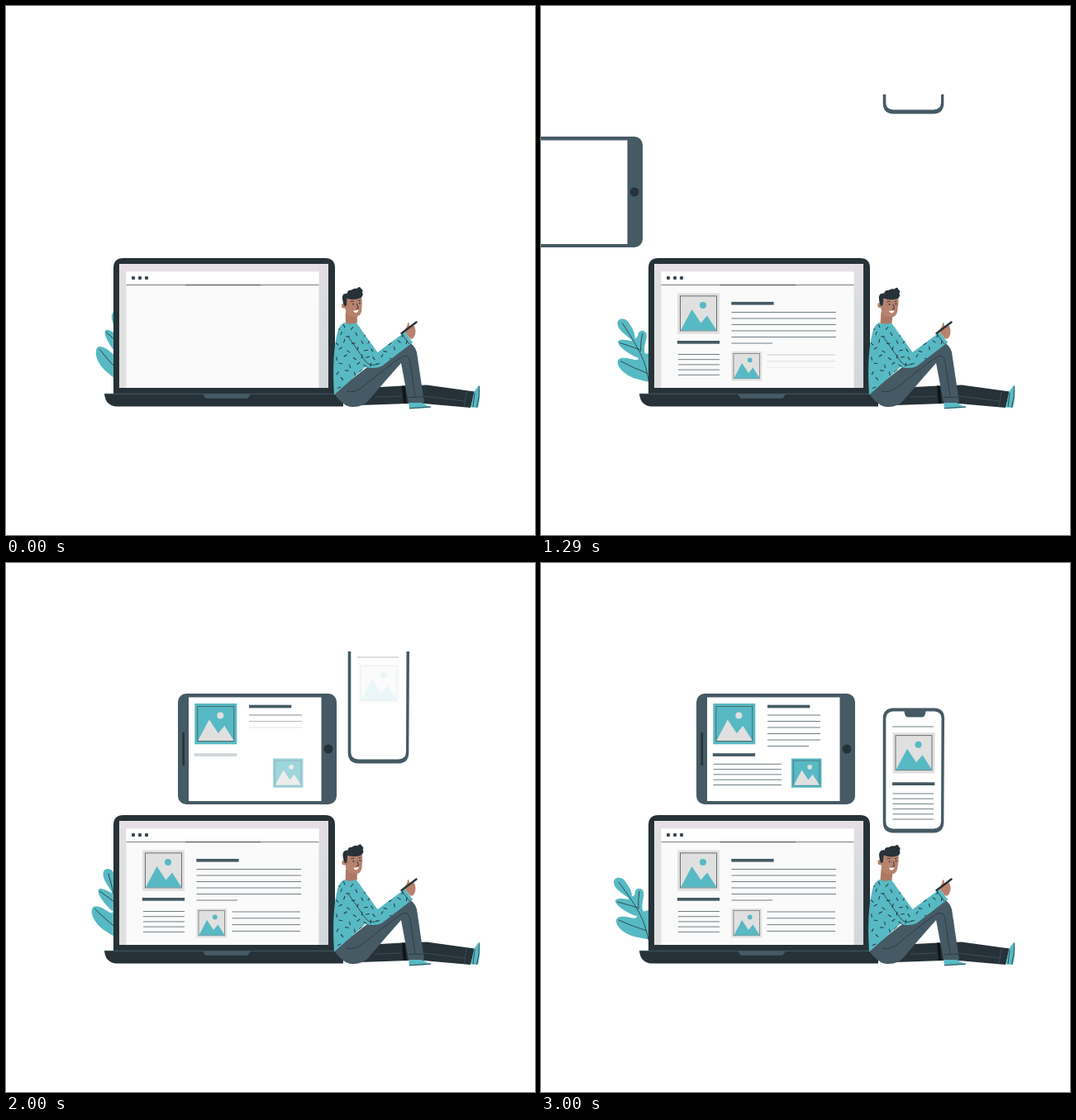
Animation, 640 px wide and 640 px high, one loop 3210 ms. Source, as an HTML page:

```html
<!DOCTYPE html>
<html lang="en">
<head>
<meta charset="utf-8">
<title>Devices</title>
<style>
html, body { margin: 0; width: 100%; height: 100%; overflow: hidden; background: #fff; }
svg { display: block; width: 100vw; height: 100vh; }
</style>
</head>
<body>
<svg id="stage" viewBox="0 0 640 640" fill="none">
  <defs>
    <clipPath id="phoneClip"><rect y="107" width="640" height="400"/></clipPath>
    <clipPath id="sweaterClip"><use href="#sweater"/></clipPath>
    <linearGradient id="side" x1="0" y1="312" x2="0" y2="462" gradientUnits="userSpaceOnUse">
      <stop stop-color="#e4dde4"/><stop offset=".35" stop-color="#d8dce0"/><stop offset="1" stop-color="#d3d8dc"/>
    </linearGradient>
  </defs>

  <g id="plant">
    <path fill="#57b9c3" d="M88 386C88 380 97 379 101 384C106 391 110 396 110 403C112 404 114 401 114 397C116 392 123 393 124 398C125 406 121 412 123 420C125 424 130 418 134 420L140 455C135 456 125 455 118 453C104 451 92 442 91 434C90 427 100 427 108 429C113 430 116 430 116 427C112 427 90 416 90 409C91 404 104 407 107 407C104 402 88 396 88 386Z"/>
    <path stroke="#263238" stroke-width=".8" d="M94 386C105 401 119 420 125 437Q129 449 132 464M92 410Q104 413 117 417M119 397Q117 408 118 419M94 432Q112 440 128 445"/>
  </g>

  <g id="tablet">
    <rect x="188" y="158" width="192" height="134" rx="10" fill="#455a64"/>
    <rect x="201" y="162.5" width="160.5" height="125.5" fill="#fff"/>
    <circle cx="370" cy="225" r="5.5" fill="#263238"/>
    <path stroke="#263238" stroke-width="2.5" d="M194.7 205V245"/>
  </g>

  <g clip-path="url(#phoneClip)"><g id="phone">
    <path fill="#455a64" d="M426 175.5H476Q488 176 488 188L487.3 314Q487 326 475 326.5H426Q414 326 413.7 314V188Q414 176 426 175.5Z"/>
    <path fill="#fff" d="M426 179.5H439.5Q440 186 444 186.500H461Q465 186 465.500 179.500H476Q484.500 180 484.500 188L484 313Q483.500 321 475 321.500H426Q417.500 321 417.300 313V188Q417.500 180 426 179.500Z"/>
  </g></g>

  <g id="laptop">
    <path fill="#263238" d="M130 470V317Q130 305 142 305H386Q398 305 398 317V470Z"/>
    <path fill="#e0e0e0" d="M137 312H390V462H137Z"/>
    <path fill="#e6dfe6" d="M137 312H390V321.500H137Z"/>
    <path fill="url(#side)" d="M378.500 312H390V462H378.500Z"/>
    <path fill="#fafafa" d="M145.500 321.500H378.500V462H145.500Z"/>
    <path fill="#fff" d="M145.500 321.500H378.500V337H145.500Z"/>
    <path stroke="#777f83" d="M145.500 337.500H378.500"/>
    <path stroke="#3c4448" d="M217 337.600H308"/>
    <g fill="#37474f"><circle cx="154" cy="329" r="2.200"/><circle cx="162" cy="329" r="2.200"/><circle cx="170" cy="329" r="2.200"/></g>
    <path fill="#263238" d="M119 469H408V484.500H133Q120 483 119 469Z"/>
    <path stroke="#455a64" d="M119 469.300H405"/>
    <path fill="#455a64" d="M238 469.500H296L292.500 474.800H241.500Z"/>
  </g>

  <g id="person">
    <path fill="#263238" d="M428 483L452 461L480 459.500L509 458.500L567 466.500L562 486L500 480.500Z"/>
    <path fill="#0d1418" d="M479 459.500H482.500L484.500 481H481Z"/>
    <path stroke="#455a64" stroke-width=".7" d="M446 473L478 472M505 472L555 478M557 466L554.500 484"/>
    <path fill="#57b9c3" d="M566 467L572.500 458Q574.500 473 571 486L562.500 485.500Z"/>
    <path stroke="#263238" stroke-width=".8" d="M572.800 460Q573 473 569.500 485.500M567 468L565 485"/>
    <path fill="#57b9c3" d="M487 480H503Q509 484 514.500 484.500L513 486L488 487.500Z"/>
    <path stroke="#37474f" stroke-width=".9" d="M488 486.700L514 485"/>
    <path fill="#455a64" d="M397 469C410 458 425 446 437 437Q465 419 482 408Q493 405 497 419L506 480H487L478 432Q460 452 439 477Q430 487 415 484.500Q406 482 397 469Z"/>
    <path stroke="#263238" stroke-width=".7" d="M412 466Q422 469 434 459Q468 431 480 424Q487 421 489 431L495 473M487 473.500L505 473"/>

    <g id="head">
      <path fill="#ad7966" d="M410 370L424 372L423 384Q415 387 409 384Z"/>
      <path fill="#b7826e" d="M409 353L431 350Q431.500 361 429.500 370Q428 377.500 419 376.500Q410 375 410 366Z"/>
      <circle cx="409" cy="362" r="3.200" fill="#b7826e"/>
      <path fill="#263238" d="M409.500 363Q405.500 352 409 348.500Q412 347 414 347.500Q414 343.500 419 344Q422 341.500 426 342.500Q430 339 431 343Q434 345 432 347.500Q434 351 430 354Q422 357 413 353.500L412 362Z"/>
      <path stroke="#263238" stroke-width=".9" d="M417 358Q419 356.800 421 357.700M426.500 357.500L429 357M424.500 361L426 366.500L423.500 367"/>
      <circle cx="420" cy="361" r=".9" fill="#263238"/><circle cx="428" cy="360.500" r=".9" fill="#263238"/>
      <path fill="#fff" d="M419.500 368.500Q423 369.500 426 368Q425 372 422 371.500Q420 371 419.500 368.500Z"/>
    </g>

    <path id="sweater" fill="#57b9c3" d="M409 383Q416 386 424 383.500L449.500 419L482.500 394.500L492 407L455 435.500Q446 440 435 436.500Q418 452 397 470.500Q394 422 401 395Q403 386 409 383Z"/>
    <g id="ticks" clip-path="url(#sweaterClip)" stroke="#263238" stroke-width="1"/>
    <path stroke="#263238" stroke-width=".8" d="M414 400L435 430Q441 437 449 433M479 397L488 409"/>
    <path fill="#b7826e" d="M483 395Q482 391 485 388L486 383.500Q488 382 488 387L494 387Q497 394 494 400Q492 404 488.500 402Z"/>
    <path stroke="#263238" stroke-width="2.400" stroke-linecap="round" d="M478.500 396L496.500 382.500"/>
  </g>
</svg>
<script>
const NS = 'http://www.w3.org/2000/svg';
const TEAL = '#57b9c3', SLATE = '#455a64', GREY = '#e0e0e0';
const FPS = 14, LAST = 42, LOOP = 3210;
const $ = id => document.getElementById(id);
const fades = [];

function add(parent, tag, attrs) {
  const el = document.createElementNS(NS, tag);
  for (const k in attrs) el.setAttribute(k, attrs[k]);
  return parent.appendChild(el);
}

function fadeIn(el, start, length = 4) {
  fades.push({ el, start, length });
}

function picture(parent, x, y, scale, back, front, start, length) {
  const g = add(parent, 'g', { transform: `translate(${x} ${y}) scale(${scale})` });
  add(g, 'rect', { width: 51, height: 49.3, fill: back });
  add(g, 'rect', { x: 3.5, y: 3.5, width: 44, height: 42, stroke: '#4b5357', 'stroke-width': .8 });
  add(g, 'path', { d: 'M4 45L17.500 19.500L28.500 36L36 27L47.500 45Z', fill: front });
  add(g, 'circle', { cx: 31, cy: 14.500, r: 4, fill: front });
  fadeIn(g, start, length);
}

function bar(parent, x, y, start) {
  fadeIn(add(parent, 'rect', { x, y, width: 51.300, height: 3.700, fill: SLATE }), start);
}

// Evenly spaced text lines that appear one after another.
function lines(parent, x1, x2, y, gap, count, start, step, lastX = x2) {
  for (let i = 0; i < count; i++) {
    const end = i === count - 1 ? lastX : x2;
    fadeIn(add(parent, 'path', {
      d: `M${x1} ${y + i * gap}H${end}`, stroke: '#68777e', 'stroke-width': .95
    }), start + i * step);
  }
}

const laptop = $('laptop'), tablet = $('tablet'), phone = $('phone');

picture(laptop, 165, 347.400, 1, GREY, TEAL, 0, 4);
bar(laptop, 164.800, 405, 3);
lines(laptop, 166, 216, 421.500, 6.200, 5, 4, .6);
bar(laptop, 230.300, 357.900, 7);
lines(laptop, 230.500, 357, 370.500, 7.500, 6, 7.800, 1.150, 280);
picture(laptop, 230.500, 418, .72, GREY, TEAL, 13, 5);
lines(laptop, 273.500, 356, 422, 7.800, 4, 16.500, .5);

picture(tablet, 208.300, 170, 1, TEAL, GREY, 20.500, 5.500);
bar(tablet, 274, 171.700, 23.700);
lines(tablet, 274, 338, 184, 7.500, 6, 24.500, 1.300, 324);
bar(tablet, 207.800, 230.200, 27);
lines(tablet, 208.500, 291, 243.300, 6.300, 5, 28.300, .6);
picture(tablet, 303, 236.500, .715, TEAL, GREY, 25.700, 4);

lines(phone, 425, 475, 198, 0, 1, 26, 1);
picture(phone, 425.500, 205.200, 1, GREY, TEAL, 27.300, 6);
bar(phone, 425, 265.300, 32.300);
lines(phone, 425.500, 475, 279, 6.200, 6, 32.800, .95);

// Scattered strokes on the sweater.
for (let row = 0; row < 10; row++) {
  for (let col = 0; col < 11; col++) {
    const n = row * 11 + col;
    const x = 402 + col * 9 + (row % 2) * 4.500 + 2 * Math.sin(n * 5.100);
    const y = 389 + row * 9 + 2 * Math.cos(n * 3.700);
    const turn = (col * 67 + row * 110) % 180;
    add($('ticks'), 'path', { d: 'M-2.300 0H2.300', transform: `translate(${x} ${y}) rotate(${turn})` });
  }
}

const sway = [[0, -2], [8, -19.500], [10, -24.300], [14, -28.500], [18, -26.300], [24, -16], [28, -8.900], [35, -19.800], [42, -29.600]];
const tabletX = [[0, -440], [14, -440], [16, -345], [18, -257], [24, -45], [28, 20], [31, 25], [35, 15], [42, 0]];
const phoneY = [[0, -222], [16, -219], [18, -196], [24, -128], [28, -84], [35, -21], [42, 0]];

// Smooth curve through [frame, value] keys, flat at turning points.
function track(keys, f) {
  let i = 0;
  while (i < keys.length - 2 && f >= keys[i + 1][0]) i++;
  const slope = k => (keys[k + 1][1] - keys[k][1]) / (keys[k + 1][0] - keys[k][0]);
  const tangent = k => {
    if (k === 0 || k === keys.length - 1) return 0;
    const a = slope(k - 1), b = slope(k);
    return a * b <= 0 ? 0 : 2 * a * b / (a + b);
  };
  const [t0, v0] = keys[i], [t1, v1] = keys[i + 1];
  const h = t1 - t0, u = (f - t0) / h;
  const ease = u * u * (3 - 2 * u);
  return v0 + (v1 - v0) * ease
    + h * u * (1 - u) * ((1 - u) * tangent(i) - u * tangent(i + 1));
}

function render(ms) {
  const f = Math.min(LAST, Math.floor((ms % LOOP + 5) * FPS / 1000));
  const angle = track(sway, f);
  $('plant').setAttribute('transform', `rotate(${angle + 29.600} 138 462)`);
  $('head').setAttribute('transform', `rotate(${-4.500 - (angle + 2) * .18} 417 380) translate(1.500 0)`);
  tablet.setAttribute('transform', `translate(${track(tabletX, f)} 0)`);
  phone.setAttribute('transform', `translate(0 ${track(phoneY, f)})`);
  for (const { el, start, length } of fades) {
    el.setAttribute('opacity', Math.max(0, Math.min(1, (f - start) / length)));
  }
}

const began = performance.now();
function tick() {
  render(performance.now() - began);
  requestAnimationFrame(tick);
}
render(0);
requestAnimationFrame(tick);
</script>
</body>
</html>
```
